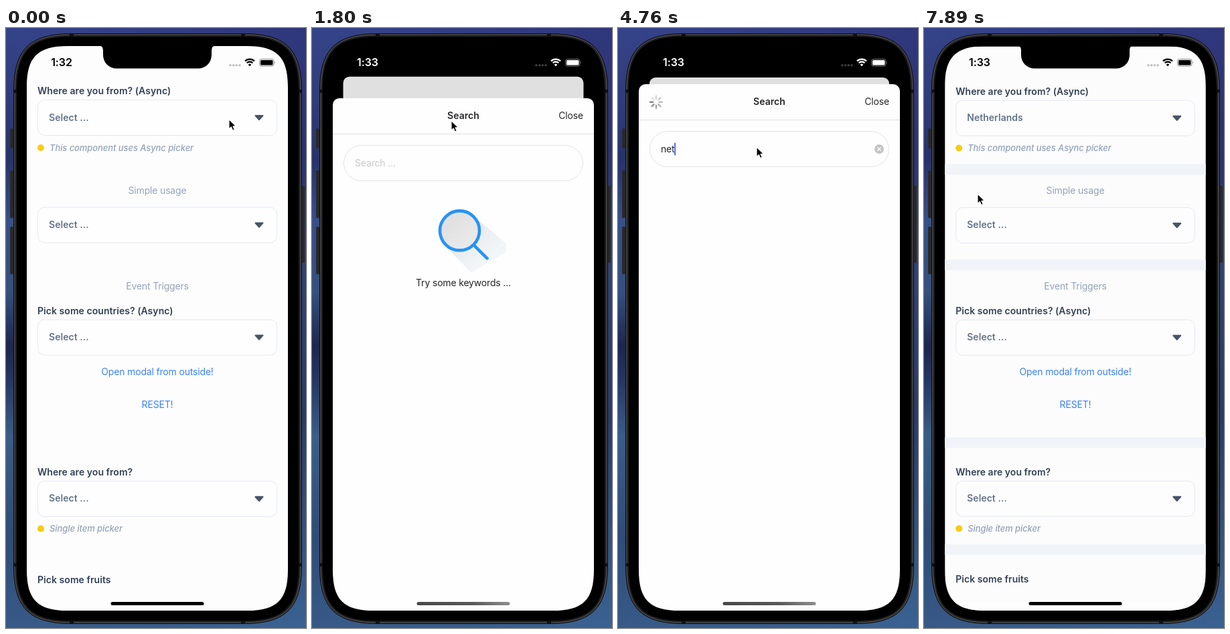
An HTML page for the animation above (8000 ms loop, 448 px wide and 897 px high).

```html
<!DOCTYPE html>
<html lang="en">
<head>
<meta charset="utf-8">
<title>Async picker</title>
<style>
  html, body { margin: 0; width: 100%; height: 100%; overflow: hidden; background: #2f4273; }
  svg { display: block; width: 100%; height: 100%; }
  text { font: 14px Inter, sans-serif; white-space: pre; }
  .reg { letter-spacing: -.17px; }
  .bold { font-weight: 600; letter-spacing: .05px; }
  .note { font-size: 13px; font-style: italic; font-weight: 500; letter-spacing: -.08px; }
  .time { font-size: 16px; font-weight: 600; letter-spacing: -.1px; }
</style>
</head>
<body>
<svg id="stage" viewBox="0 0 448 897"></svg>
<script>
const LOOP = 8000, START = 450, TICK = 148.8;
const TOP = 27, BOTTOM = 871, SHEET_TOP = 84;
const INK = '#27272a', SLATE = '#334155';
const PARTIAL = ['Brunei Darussalam', 'Equatorial Guinea', 'Guinea', 'Guinea-Bissau', 'Indonesia', 'Nepal',
  'Netherlands', 'Netherlands Antilles', 'New Caledonia', 'New Zealand', 'Papua New Guinea',
  'Saint Vincent and the Grenadines'];
const FINAL = ['Netherlands', 'Netherlands Antilles'];

const rect = (x, y, w, h, fill, rx = 0, more = '') =>
  `<rect x="${x}" y="${y}" width="${w}" height="${h}" rx="${rx}" fill="${fill}" ${more}/>`;
const circle = (x, y, r, fill, more = '') => `<circle cx="${x}" cy="${y}" r="${r}" fill="${fill}" ${more}/>`;
const path = (d, fill, more = '') => `<path d="${d}" fill="${fill}" ${more}/>`;
const text = (x, y, str, cls, fill, more = '') =>
  `<text x="${x}" y="${y}" class="${cls}" fill="${fill}" ${more}>${str}</text>`;
const centered = (y, str, fill, cls = 'reg') => text(226, y, str, cls, fill, 'text-anchor="middle"');

// rounded rectangle with continuous-curvature corners
function squircle(x, y, w, h, r, fill, more) {
  const a = 1.3 * r, c = .348 * r, sx = w - 2 * a, sy = h - 2 * a, b = a - c;
  return path(`M${x} ${y + a}c0 ${-b} ${b} ${-a} ${a} ${-a}`.replace(`${b} ${-a} ${a}`, `${c} ${-a} ${a}`) +
    `h${sx}c${b} 0 ${a} ${b} ${a} ${a}`.replace(`${a} ${b} ${a} ${a}`, `${a} ${c} ${a} ${a}`) +
    `v${sy}c0 ${b} ${-c} ${a} ${-a} ${a}h${-sx}c${-b} 0 ${-a} ${-c} ${-a} ${-a}z`, fill, more);
}

const ACROSS = 'x1="0" y1="0" x2="1" y2="0"', DOWN = 'x1="0" y1="0" x2="0" y2="1"', DIAGONAL = 'x1="0" y1="0" x2="1" y2="1"';
const gradient = (id, dir, stops) =>
  `<linearGradient id="${id}" ${dir}>` +
  stops.map(([at, color, alpha = 1]) =>
    `<stop offset="${at}" stop-color="${color}" stop-opacity="${alpha}"/>`).join('') + '</linearGradient>';

const select = (y, id = '') =>
  rect(47.5, y, 357, 53, '#fefefe', 10, 'stroke="#e4e8f0"') +
  text(64, y + 31, 'Select ...', 'bold', '#64748b', id && `id="${id}"`) +
  path(`M372.6 ${y + 23.6}h10.8l-5.4 6z`, '#475569', 'stroke="#475569" stroke-width="2.2" stroke-linejoin="round"');
const note = (y, str) => circle(52, y, 5, '#facc15') + text(65, y + 4.5, str, 'note', '#94a3b8');

const page = () =>
  rect(31, TOP, 390, 844, '#fdfdfe', 10) +
  '<g id="bands">' + [203, 346, 612, 772].map(y => rect(31, y, 390, 15.7, '#f1f5f9')).join('') + '</g>' +
  text(47, 99, 'Where are you from? (Async)', 'bold', SLATE) + select(107.5, 'answer') +
  note(179, 'This component uses Async picker') +
  centered(248, 'Simple usage', '#94a3b8') + select(268) +
  centered(391, 'Event Triggers', '#94a3b8') +
  text(47, 428, 'Pick some countries? (Async)', 'bold', SLATE) + select(436) +
  centered(519, 'Open modal from outside!', '#3b82f6') +
  centered(568, 'RESET!', '#3b82f6') +
  text(47, 669, 'Where are you from?', 'bold', SLATE) + select(677.3) +
  note(748.5, 'Single item picker') +
  text(47, 829.5, 'Pick some fruits', 'bold', SLATE) +
  rect(31, TOP, 390, 844, '#000', 10, 'id="dim"');

// sheet coordinates start at its top edge
const sheet = () =>
  rect(31, 0, 390, 900, '#fefefe', 10) +
  centered(31.3, 'Search', INK, 'bold') +
  text(405, 31.3, 'Close', 'reg', INK, 'text-anchor="end"') +
  rect(31, 53, 390, 1, '#dededf') +
  rect(47.5, 70.5, 357, 53, '#fefefe', 26.5, 'stroke="#e2e2e4"') +
  text(64, 102, '', 'reg', INK, 'id="query"') +
  rect(64, 87.5, 1.8, 19, '#3f68e0', .9, 'id="caret"') +
  '<g id="clear">' + circle(390, 97, 7, '#c5c5c8') +
  path('M387.6 94.6l4.8 4.8m0-4.8l-4.8 4.8', 'none', 'stroke="#fff" stroke-width="1.3" stroke-linecap="round"') + '</g>' +
  '<g id="spinner">' + [...Array(8).keys()].map(i =>
    rect(60.6, 25.6, 6.6, 2.4, '#888', 1.2, `transform="rotate(${i * 45} 57 26.8)"`)).join('') + '</g>' +
  '<g id="empty">' + path('M241 176L290 217V230L238 261L198 220Z', 'url(#shade)') +
  circle(220.5, 198, 29.5, 'url(#lens)', 'stroke="#2793f3" stroke-width="4.6"') +
  path('M242 220L261.5 239.5', 'none', 'stroke="#2793f3" stroke-width="4.6" stroke-linecap="round"') +
  centered(281.5, 'Try some keywords ...', INK) + '</g><g id="rows"></g>';

const row = (name, i) => `<g>${rect(47, 156 + 52 * i, 20, 20, '#e2e8f0', 4)}` +
  `${text(75, 171.2 + 52 * i, name, 'reg', INK)}</g>`;

const status = () =>
  text(83, 57.3, '', 'time', 'currentColor', 'id="clock" text-anchor="middle"') +
  [335, 339.7, 344.3, 349].map(x => circle(x, 55.7, 1.8, 'currentColor', 'opacity=".24"')).join('') +
  path('M357 49.5a10 10 0 0 1 14 0M359.6 52.3a6.3 6.3 0 0 1 8.8 0', 'none', 'stroke="currentColor" stroke-width="2.3"') +
  path('M361.7 54.7a3.3 3.3 0 0 1 4.6 0L364 57.3z', 'currentColor') +
  rect(378.5, 46.5, 21.5, 10.5, 'none', 3, 'stroke="currentColor" stroke-opacity=".45"') +
  rect(380, 48, 18.5, 7.5, 'currentColor', 1.6) +
  path('M401.3 50q1.6 1.7 0 3.6z', 'currentColor', 'opacity=".5"');

const phone = () => {
  const keys = [[6, 150, 30], [6, 213, 71], [6, 297, 71], [441, 236, 115]];
  return rect(0, 0, 448, 897, 'url(#wallLeft)') + rect(0, 0, 448, 897, 'url(#wallRight)', 0, 'mask="url(#fade)"') +
    keys.map(([x, y, h]) => rect(x, y, 5, h, '#29292c', 1.5)).join('') +
    squircle(11.5, 8.5, 430, 882, 67, '#2b2b2d', 'stroke="#0c0c0e"') +
    squircle(13, 10, 427, 879, 65.5, '#1f1f21', 'stroke="#5a5a5c"') +
    [95, 351].map(x => rect(x, 9, 6, 4, '#111') + rect(x, 886, 6, 4, '#111')).join('') +
    [92, 800].map(y => rect(12, y, 4, 5, '#111') + rect(437, y, 4, 5, '#111')).join('') +
    squircle(16, 13, 421, 873, 62, '#000');
};

const stage = document.getElementById('stage');
stage.innerHTML = '<defs>' +
  gradient('wallLeft', DOWN, [[0, '#36448a'], [.13, '#303c78'], [.22, '#28336a'], [.32, '#39508a'], [.44, '#36507f'],
    [.53, '#1d274e'], [.58, '#243560'], [.68, '#3b5e88'], [.85, '#304c77'], [1, '#385a88']]) +
  gradient('wallRight', DOWN, [[0, '#30377c'], [.2, '#2b3472'], [.4, '#304374'], [.65, '#293c69'], [.85, '#335482'], [1, '#3a6292']]) +
  gradient('across', ACROSS, [[0, '#000'], [1, '#fff']]) +
  gradient('shade', DIAGONAL, [[0, '#cfd3d7', .85], [.7, '#e9eff4', .6], [1, '#f0f6fa', .5]]) +
  gradient('lens', DIAGONAL, [[0, '#dcdcdd'], [1, '#ededee']]) +
  gradient('bar', ACROSS, [[0, '#484848'], [.6, '#585858'], [1, '#8e8e8e']]) +
  `<mask id="fade">${rect(0, 0, 448, 897, 'url(#across)')}</mask>` +
  `<clipPath id="screen">${squircle(31, TOP, 390, 844, 47, '#000')}</clipPath></defs>` +
  phone() + `<g clip-path="url(#screen)"><g id="page">${page()}</g><g id="sheet">${sheet()}</g></g>` +
  path('M139 26.5q6 0 6 7v7a20 20 0 0 0 20 20h122a20 20 0 0 0 20-20v-7q0-7 6-7z', '#000') +
  `<g id="status">${status()}</g>` + rect(156.5, 858, 139, 5, '#000', 2.5, 'id="home"') +
  '<g id="cursor">' + path('M0 0V14.5L3.4 11.4L5.7 16.6L8.3 15.5L6 10.4H10.6Z', '#000',
    'stroke="#fff" stroke-width="1.1" stroke-linejoin="round"') + '</g>';

const ui = {};
stage.querySelectorAll('[id]').forEach(el => ui[el.id] = el);
const set = (el, name, value) => el.setAttribute(name, value);
const show = (el, on) => set(el, 'visibility', on ? 'visible' : 'hidden');
const clamp = x => Math.min(1, Math.max(0, x));
const ease = (t, from, to) => { const p = clamp((t - from) / (to - from)); return p * p * (3 - 2 * p); };
// what is left of a critically damped spring released at `from`
const spring = (t, from) => { const x = Math.max(0, t - from) * .0182; return (1 + x) * Math.exp(-x); };

let shownRows = null;
function setRows(names) {
  if (names !== shownRows) ui.rows.innerHTML = names.map(row).join('');
  shownRows = names;
}

const NONE = [], CARET_X = [64, 71.6, 79.6, 84.2];

function draw(ms) {
  const k = ms < START ? -1 : Math.min(50, Math.floor((ms - 430) / TICK));
  const t = START + TICK * k;
  const between = (a, b) => k >= a && k < b;

  const open = t < 5000 ? 1 - spring(t, 1487) : spring(t, 7559.8);
  const sheetY = BOTTOM - (BOTTOM - SHEET_TOP) * open;
  set(ui.page, 'transform', `translate(226 ${TOP + 47 * open}) scale(${1 - .082 * open}) translate(-226 ${-TOP})`);
  set(ui.sheet, 'transform', `translate(0 ${sheetY})`);
  show(ui.sheet, open > 0);
  set(ui.dim, 'opacity', .115 * open);
  show(ui.bands, k >= 0);
  ui.answer.textContent = k >= 47 ? 'Netherlands' : 'Select ...';

  const modal = between(8, 47);
  set(ui.status, 'color', modal ? '#fff' : '#000');
  ui.clock.textContent = k < 0 ? '1:32' : '1:33';
  set(ui.home, 'fill', modal ? 'url(#bar)' : '#000');

  const typed = (k >= 20) + (k >= 23) + (k >= 29);
  ui.query.textContent = typed ? 'net'.slice(0, typed) : 'Search ...';
  set(ui.query, 'fill', typed ? INK : '#c7c7cc');
  set(ui.caret, 'x', CARET_X[typed]);
  const blink = k < 20 ? +(k < 16) : k < 30 ? 1 : [1, 1, 1, 1, .25, 0, 0][(k - 33 + 7) % 7];
  set(ui.caret, 'opacity', blink);
  show(ui.caret, between(14, 46));
  show(ui.clear, between(20, 46));
  show(ui.empty, k < 20 && open > 0);

  show(ui.spinner, between(20, 26) || between(29, 36));
  [...ui.spinner.children].forEach((petal, i) =>
    set(petal, 'opacity', 1 - .11 * ((k - 17 - i + 16) % 8)));

  setRows(between(26, 29) ? PARTIAL : k >= 35 ? FINAL : NONE);
  if (k >= 35) set(ui.rows.firstChild, 'opacity', k < 46 ? 1 : k === 46 ? .3 : k === 47 ? .45 : .68);

  const a = ease(t, START, 1150), b = ease(t, 1950, 2400), c = ease(t, 6250, 7080);
  set(ui.cursor, 'transform', `translate(${333 - 125 * a - b - 127 * c} ${136.5 + 2 * a + 39.5 * b + 70 * c})`);
}

const t0 = performance.now();
function loop() {
  draw((performance.now() - t0) % LOOP);
  requestAnimationFrame(loop);
}
loop();
</script>
</body>
</html>
```
